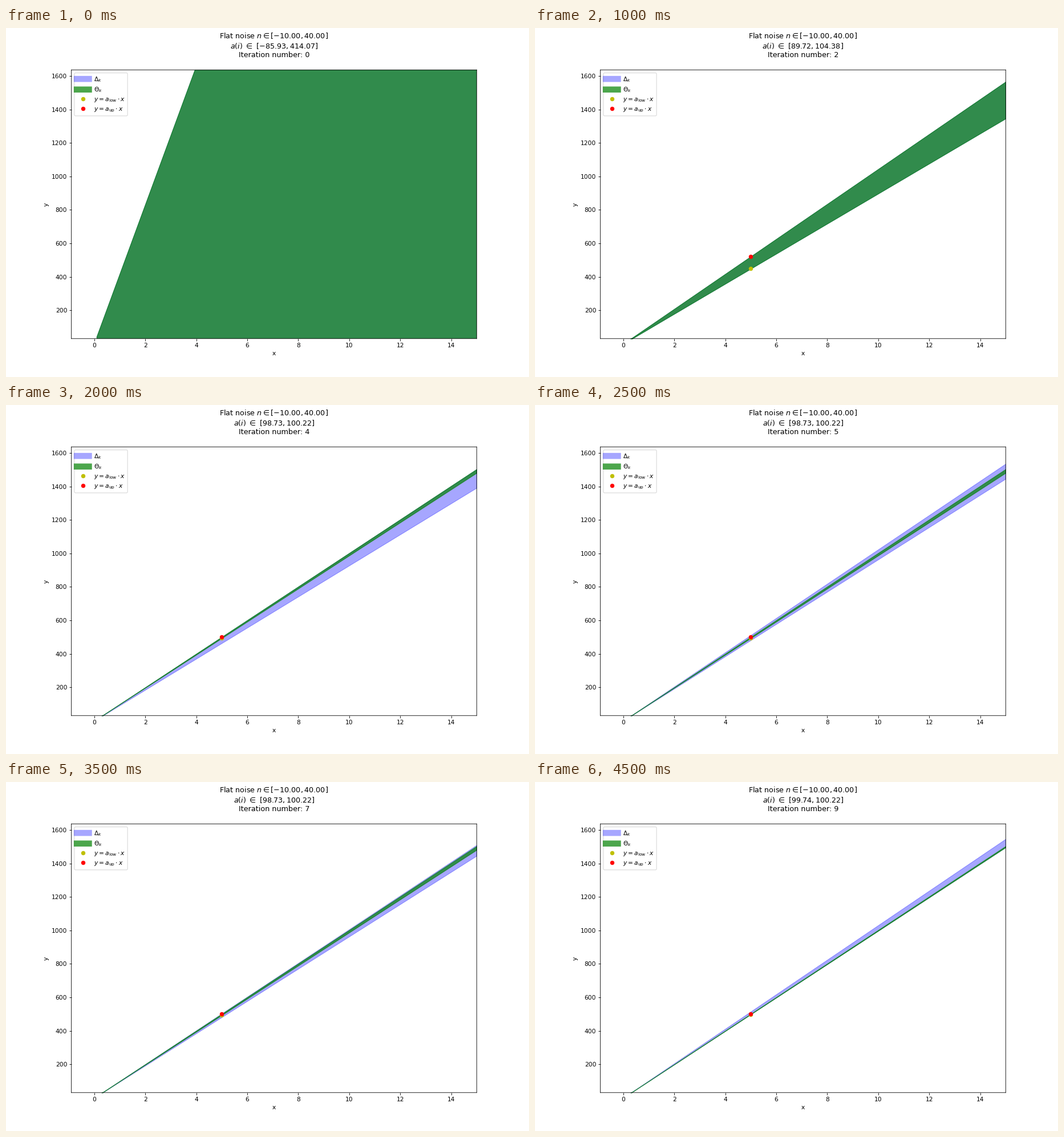
These frames come from a looping animation (917x611 px, 5000 ms). A matplotlib script:

```python
import matplotlib.pyplot as plt
import numpy as np
from matplotlib.animation import FuncAnimation
from matplotlib.lines import Line2D

WIDTH, HEIGHT = 917, 611
DPI = WIDTH / 12
NOISE_LOW, NOISE_UP = -10, 40
X = np.linspace(0.1, 15, 10)
X_MARK = 5

# Lower slope of each measured cone; its width follows from the noise range.
delta_low = np.array([-85.93, 80.50, 89.72, 98.73, 92.78,
                      96.39, 97.00, 96.38, 97.60, 99.74])
delta_up = delta_low + (NOISE_UP - NOISE_LOW) / X
theta_low = np.maximum.accumulate(delta_low)
theta_up = np.minimum.accumulate(delta_up)

plt.rcParams.update({"font.family": "DejaVu Sans", "path.snap": False})
fig, ax = plt.subplots(
    figsize=((WIDTH + 1e-6) / DPI, (HEIGHT + 1e-6) / DPI), dpi=DPI)
ax.set_xlim(X[0] - 1, X[-1])
ax.set_ylim(31.4, 1636.1)
ax.set_xlabel("x")
ax.set_ylabel("y")


def cone(low, up):
    a, b = X[0], X[-1]
    return np.array([(a, low * a), (b, low * b), (b, up * b), (a, up * a)])


def add_cone(color, alpha):
    return ax.fill_between([X[0], X[-1]], 0, 1, color=color, alpha=alpha)


delta = add_cone("b", 0.35)
theta = add_cone("g", 0.7)
low_dot, = ax.plot([], [], "yo")
up_dot, = ax.plot([], [], "ro")

ax.legend(
    [Line2D([], [], color="b", alpha=0.35, lw=10),
     Line2D([], [], color="g", alpha=0.7, lw=10),
     low_dot, up_dot],
    [r"$\Delta_k$", r"$\Theta_k$",
     r"$y = a_{\mathrm{low}} \cdot x$", r"$y = a_{\mathrm{up}} \cdot x$"],
    loc="upper left", labelspacing=0.45)


def update(k):
    low, up = theta_low[k], theta_up[k]
    delta.set_verts([cone(delta_low[k], delta_up[k])])
    theta.set_verts([cone(low, up)])
    low_dot.set_data([X_MARK], [low * X_MARK])
    up_dot.set_data([X_MARK], [up * X_MARK])
    ax.set_title(
        rf"Flat noise $n \in [{NOISE_LOW:.2f}, {NOISE_UP:.2f}]$" + "\n"
        + rf"$a(i)$ $\in$ $[{low:.2f}, {up:.2f}]$" + "\n"
        + f"Iteration number: {k}\n", linespacing=1.25)
    return delta, theta, low_dot, up_dot


anim = FuncAnimation(fig, update, frames=len(X), interval=500,
                     init_func=lambda: update(0), repeat=True,
                     repeat_delay=0, blit=False)
plt.show()
```
